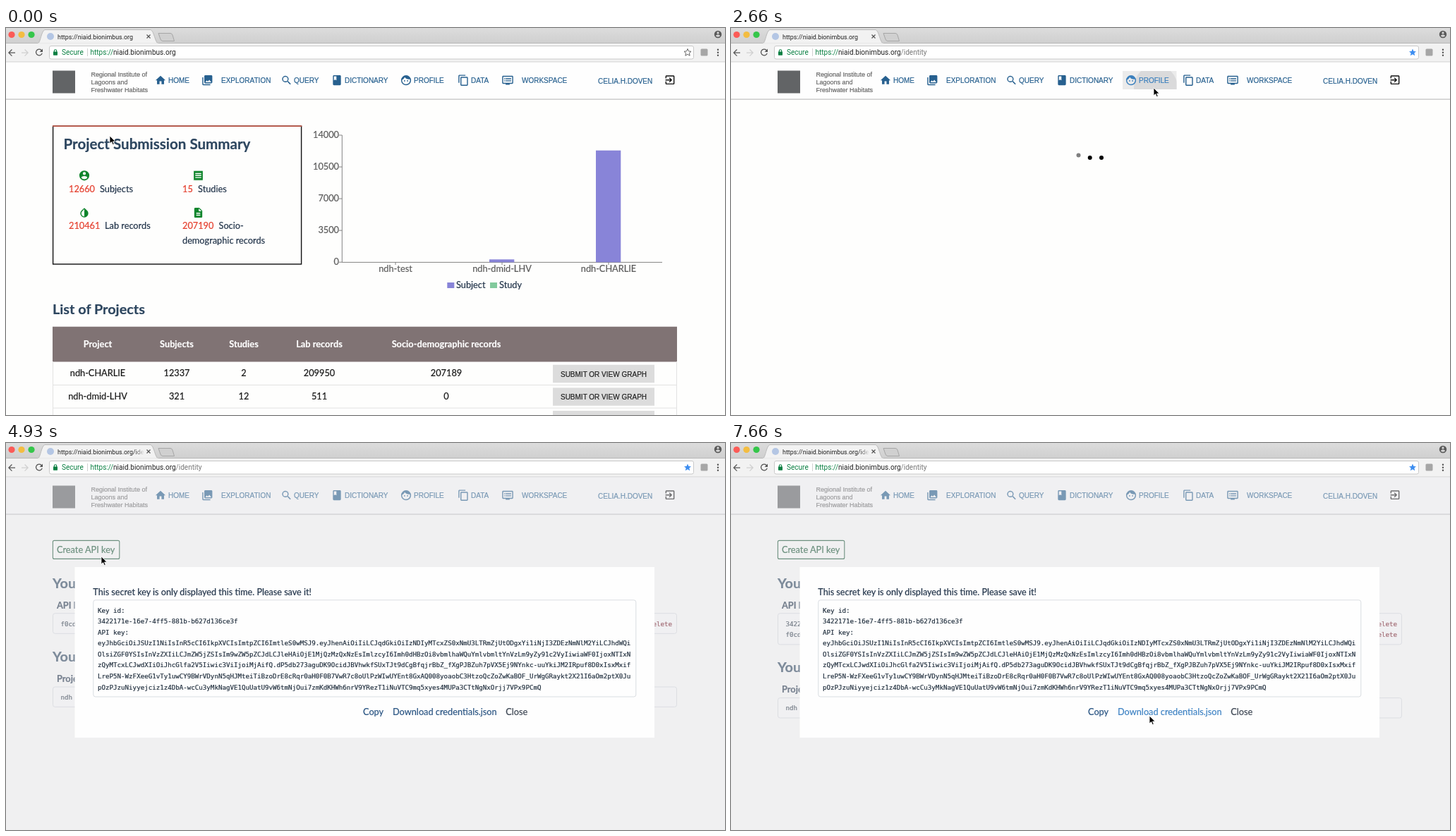
Animation of 1019x549 px, one loop 8 s. Source, as an HTML page:

```html
<!DOCTYPE html>
<html lang="en">
<head>
<meta charset="utf-8">
<title>API key walkthrough</title>
<style>
  html, body { margin: 0; width: 100%; height: 100%; overflow: hidden; background: #fefefd; }
  svg { display: block; }
  text, tspan { fill: currentColor; stroke: currentColor; stroke-width: .2px; }
  .ui { font-family: Roboto, sans-serif; font-size: 10.05px; color: #222; stroke-width: 0; }
  .ui tspan { stroke-width: 0; }
  .nav { font-family: "Liberation Sans", Arial, sans-serif; font-size: 10px; color: #27608f; }
  .icon { fill: currentColor; }
  .org { font-family: "Liberation Sans", Arial, sans-serif; font-size: 9px; color: #666; }
  .body { font-family: Lato, sans-serif; font-size: 12.75px; color: #22344a; }
  .bold { font-weight: 700; }
  .title { font-family: Lato, sans-serif; font-size: 19.85px; font-weight: 700; color: #2d465f; }
  .mono { font-family: "DejaVu Sans Mono", monospace; font-size: 9.17px; color: #22303f; }
  .mid { text-anchor: middle; }
  .end { text-anchor: end; }
  .on, .on .nav { color: #3a7fbd; }
</style>
</head>
<body>
<svg id="stage" width="1019" height="549" viewBox="0 0 1019 549"></svg>
<script>
const LOOP = 8000;
const host = 'niaid.bionimbus.org';
const keyId = '3422171e-16e7-4ff5-881b-b627d136ce3f';
const oldKeyId = 'f0cd5366-5185-4e5c-b2ae-3b7b798a9a0e';
const ROW = 15.6;

// The moments at which the screen changes state.
const AT = { hover: 430, load: 2660, profile: 2930, leaveNav: 3430, overButton: 3930,
             modal: 4930, newRow: 5930, overDownload: 6430 };

// Pointer poses: time, x, y; each holds until the next.
const pointer = [
  [0, 147, 153], [160, 376, 127], [430, 578, 79], [660, 585, 77], [930, 579, 72],
  [1160, 583, 75], [1430, 590, 80], [1660, 594, 83], [1930, 598, 85], [2160, 599, 85],
  [3160, 598, 88], [3430, 326, 141], [3660, 245, 153], [3930, 142, 160], [4160, 135, 161],
  [5430, 185, 190], [5660, 390, 285], [5930, 535, 345], [6160, 588, 371],
  [6430, 592, 385], [6660, 593, 387],
];

const text = (x, y, s, cls, more = '') => `<text x="${x}" y="${y}" class="${cls}" ${more}>${s}</text>`;
const rect = (x, y, w, h, fill, more = '') =>
  `<rect x="${x}" y="${y}" width="${w}" height="${h}" fill="${fill}" ${more}/>`;
const circle = (x, y, r, fill) => `<circle cx="${x}" cy="${y}" r="${r}" fill="${fill}"/>`;
const path = (d, stroke, more = '') => `<path d="${d}" stroke="${stroke}" fill="none" ${more}/>`;
const group = (id, inner, more = '') => `<g id="${id}" ${more}>${inner}</g>`;
const frame = (x, y, w, h, more = '') => rect(x, y, w, h, '#fefefe', `stroke="#d9dde1" rx="3" ${more}`);

const glyphs = {
  home: 'M10 20v-6h4v6h5v-8h3L12 3 2 12h3v8z',
  gallery: 'M22 16V4c0-1.1-.9-2-2-2H8c-1.1 0-2 .9-2 2v12c0 1.1.9 2 2 2h12c1.1 0 2-.9 2-2zm-11-4l2 2.7L16 11l4 5H8zM2 6v14c0 1.1.9 2 2 2h14v-2H4V6z',
  search: 'M15.5 14h-.8l-.3-.3A6.5 6.5 0 1 0 13.7 14.4l.3.3v.8l5 5 1.5-1.5zm-6 0a4.5 4.5 0 1 1 0-9 4.5 4.5 0 0 1 0 9z',
  book: 'M18 2H6c-1.1 0-2 .9-2 2v16c0 1.1.9 2 2 2h12c1.1 0 2-.9 2-2V4c0-1.1-.9-2-2-2zM6 4h5v8l-2.5-1.5L6 12z',
  face: 'M9 11.7a1.3 1.3 0 1 0 0 2.6 1.3 1.3 0 0 0 0-2.6zm6 0a1.3 1.3 0 1 0 0 2.6 1.3 1.3 0 0 0 0-2.6zM12 2a10 10 0 1 0 0 20 10 10 0 0 0 0-20zm0 18a8 8 0 0 1-7.95-8.86c2.36-1.05 4.23-2.98 5.21-5.37C11.07 8.33 14.05 10 17.42 10c.78 0 1.53-.09 2.25-.26A8 8 0 0 1 12 20z',
  copy: 'M16 1H4c-1.1 0-2 .9-2 2v14h2V3h12zm3 4H8c-1.1 0-2 .9-2 2v14c0 1.1.9 2 2 2h11c1.1 0 2-.9 2-2V7c0-1.1-.9-2-2-2zm0 16H8V7h11z',
  screen: 'M21 3H3c-1.1 0-2 .9-2 2v12c0 1.1.9 2 2 2h5v2h8v-2h5c1.1 0 2-.9 2-2V5c0-1.1-.9-2-2-2zm0 14H3V5h18zM19 8H8v2h11zm0 4H8v2h11zM7 8H5v2h2zm0 4H5v2h2z',
  exit: 'M10.1 15.6L11.5 17l5-5-5-5-1.4 1.4L12.7 11H3v2h9.7zM19 3H5c-1.1 0-2 .9-2 2v4h2V5h14v14H5v-4H3v4c0 1.1.9 2 2 2h14c1.1 0 2-.9 2-2V5c0-1.1-.9-2-2-2z',
  person: 'M12 2a10 10 0 1 0 0 20 10 10 0 0 0 0-20zm0 3a3 3 0 1 1 0 6 3 3 0 0 1 0-6zm0 14.2c-2.5 0-4.7-1.3-6-3.2 0-2 4-3.1 6-3.1s6 1.1 6 3.1c-1.3 1.9-3.5 3.2-6 3.2z',
  receipt: 'M18 17H6v-2h12zm0-4H6v-2h12zm0-4H6V7h12zM3 22l1.5-1.5L6 22l1.5-1.5L9 22l1.5-1.5L12 22l1.5-1.5L15 22l1.5-1.5L18 22l1.5-1.5L21 22V2l-1.5 1.5L18 2l-1.5 1.5L15 2l-1.5 1.5L12 2l-1.5 1.5L9 2 7.5 3.5 6 2 4.5 3.5 3 2z',
  drop: 'M17.7 7.9L12 2.3 6.3 7.9a8 8 0 1 0 11.4 0zM12 19.6a6 6 0 0 1-4.2-10.3L12 5.1z',
  page: 'M14 2H6c-1.1 0-2 .9-2 2v16c0 1.1.9 2 2 2h12c1.1 0 2-.9 2-2V8zm2 16H8v-2h8zm0-4H8v-2h8zm-3-5V3.5L18.5 9z',
  back: 'M20 11H7.8l5.6-5.6L12 4l-8 8 8 8 1.4-1.4L7.8 13H20z',
  reload: 'M17.65 6.35A8 8 0 1 0 19.7 14h-2.1A6 6 0 1 1 16.2 7.8L13 11h7V4z',
  star: 'M12 2l3 6.9 7 .6-5.3 4.7 1.6 7.3L12 17.6l-6.3 3.9 1.6-7.3L2 9.5l7-.6z',
};
const icon = (name, x, y, size = 17, more = 'class="icon"') =>
  `<path d="${glyphs[name]}" fill-rule="evenodd" transform="translate(${x - size / 2} ${y - size / 2}) scale(${size / 24})" ${more}/>`;

function browser() {
  const lights = ['#fb5b57', '#f3bd41', '#35c64a'].map((c, i) => circle(8 + 14 * i, 9.5, 4.6, c)).join('');
  return `<defs>
      <linearGradient id="bar" x2="0" y2="1"><stop stop-color="#dcdcdc"/><stop offset="1" stop-color="#cfcfcf"/></linearGradient>
      <linearGradient id="fade"><stop stop-color="#f2f2f2" stop-opacity="0"/><stop offset="1" stop-color="#f2f2f2"/></linearGradient>
    </defs>`
    + rect(0, 0, 1019, 22, 'url(#bar)') + rect(0, 22, 1019, 26, '#f2f2f2')
    + path('M0 21.5H1019', '#b9b9b9') + lights
    + '<path d="M45 22.2C49 21 50 4 55 2.5H205C210 4 211 21 216 22.2z" fill="#f2f2f2" stroke="#b0b0b0" stroke-width=".8"/>'
    + rect(45, 21.6, 171, 2, '#f2f2f2')
    + '<path d="M216 7.5H233Q235 7.5 236 10L238.5 18.5H222Q220 18.5 219 16z" fill="#d0d0d0" stroke="#a6a6a6"/>'
    + circle(63, 12, 5, '#b4c6e4')
    + text(73, 15.5, '', 'ui', 'id="tab" style="font-size:8.9px"')
    + rect(182, 4, 14, 16, 'url(#fade)')
    + path('M199.5 9.5l5 5m0-5l-5 5', '#555', 'stroke-width="1.2"')
    + icon('person', 1009, 9, 12.5, 'fill="#5a5a5a"')
    + icon('back', 8, 35, 15, 'fill="#555"')
    + `<g transform="scale(-1 1)">${icon('back', -27, 35, 15, 'fill="#cfcfcf"')}</g>`
    + icon('reload', 47, 34.5, 15, 'fill="#555"')
    + rect(61.5, 25.5, 913, 18.5, '#fff', 'stroke="#c9c9c9" rx="2.5"')
    + rect(67, 33.5, 6, 5.2, '#0b8043', 'rx=".6"') + path('M68.3 34v-1.6a1.7 1.7 0 0 1 3.4 0V34', '#0b8043', 'stroke-width="1.1"')
    + text(79, 38.2, 'Secure', 'ui', 'style="color:#0b8043"') + path('M115.5 29V40', '#d0d0d0')
    + text(119.5, 38.2, `<tspan style="color:#0b8043">https://</tspan>${host}<tspan id="route" style="color:#777">/identity</tspan>`, 'ui')
    + icon('star', 966, 34.5, 12, 'id="star"')
    + rect(984.5, 29.5, 10, 10, '#a6a6a6', 'rx="1.5"')
    + [30.8, 34.8, 38.8].map(y => circle(1009, y, 1.2, '#555')).join('');
}

function header() {
  const items = [
    ['home', 219, 230, 'HOME'], ['gallery', 285.3, 305, 'EXPLORATION'], ['search', 397.7, 408, 'QUERY'],
    ['book', 469, 480, 'DICTIONARY'], ['face', 567, 578, 'PROFILE'], ['copy', 648.3, 659, 'DATA'],
    ['screen', 711, 731, 'WORKSPACE'],
  ];
  return rect(0, 48, 1019, 53, '#fefefe') + rect(0, 47.5, 1019, 1, '#d4d4d4')
    + rect(0, 100.3, 1019, 1.7, '#d2d2d2')
    + rect(66, 60.5, 32, 32, '#626466')
    + ['Regional Institute of', 'Lagoons and', 'Freshwater Habitats'].map((s, i) => text(120.5, 69 + 11.2 * i, s, 'org')).join('')
    + rect(555, 61, 76.5, 26, '#ebebeb', 'id="navHover"')
    + '<clipPath id="navClip"><rect x="555" y="61" width="76.5" height="26"/></clipPath>'
    + '<circle id="ripple" cx="602" cy="84" fill="#dadadb" clip-path="url(#navClip)"/>'
    + items.map(([g, ix, tx, s]) => group('item' + s, `<g class="nav">${icon(g, ix, 74.2)}${text(tx, 78, s, 'nav')}</g>`)).join('')
    + text(839, 79, 'CELIA.H.DOVEN', 'nav') + icon('exit', 941, 73.7, 17, 'fill="#111"');
}

function summary() {
  const stats = [
    ['person', 111, 209.3, 89, '12660', 133, 'Subjects'], ['receipt', 272.5, 209.3, 250, '15', 272, 'Studies'],
    ['drop', 111, 262, 89, '210461', 140, 'Lab records'], ['page', 272.5, 262, 250, '207190', 301.5, 'Socio-'],
  ];
  return rect(66.6, 139.3, 352, 195.7, 'none', 'stroke="#111" stroke-width="1.4"') + rect(66, 138.3, 353.3, 1.7, '#b8503f')
    + text(81.5, 172.3, 'Project Submission Summary', 'title', 'style="font-size:20.55px"')
    + stats.map(([g, ix, iy, nx, n, lx, label]) => icon(g, ix, iy, 17, 'fill="#0f852c"')
      + text(nx, iy + 23.3, n, 'body', 'style="color:#e5402f"') + text(lx, iy + 23.3, label, 'body')).join('')
    + text(250, 306, 'demographic records', 'body');
}

function chart() {
  const grey = 'style="color:#5c5c5c"';
  let out = path('M476.3 152V332.4H930', '#777', 'stroke-width=".9"');
  for (let i = 0; i < 5; i++) {
    const y = 332.2 - 45.05 * i;
    out += path(`M472 ${y}h4.3`, '#777', 'stroke-width=".9"') + text(472, y + 4.2, 3500 * i, 'body end', grey);
  }
  ['ndh-test', 'ndh-dmid-LHV', 'ndh-CHARLIE'].forEach((s, i) => {
    const x = 552 + 151 * i;
    out += path(`M${x} 332v4`, '#777', 'stroke-width=".9"') + text(x, 346, s, 'body mid', grey);
  });
  return out + rect(685, 328.3, 35.3, 4, '#8884d8') + rect(836, 173.7, 35.3, 158.6, '#8884d8')
    + rect(625.3, 361, 10, 8, '#8884d8') + text(638, 368.5, 'Subject', 'body')
    + rect(686, 361, 10, 8, '#82ca9d') + text(699, 368.5, 'Study', 'body');
}

function projects() {
  const columns = [130, 242, 337, 444, 624];
  const cells = (values, y, color, cls = '') =>
    values.map((v, i) => text(columns[i], y, v, 'body mid ' + cls, `style="color:${color}"`)).join('');
  let out = text(66, 406.3, 'List of Projects', 'title') + rect(66, 423.7, 885, 49.8, '#807374')
    + cells(['Project', 'Subjects', 'Studies', 'Lab records', 'Socio-demographic records'], 452.7, '#fff', 'bold');
  [['ndh-CHARLIE', 12337, 2, 209950, 207189], ['ndh-dmid-LHV', 321, 12, 511, 0], []].forEach((row, i) => {
    const y = 32.6 * i;
    out += cells(row, 494.4 + y, '#1a1a1a') + rect(775, 477.8 + y, 144, 25.4, '#dcdcdc')
      + text(847, 494.6 + y, 'SUBMIT OR VIEW GRAPH', 'nav mid', 'style="color:#222"')
      + path(`M66 ${506.5 + y}H951`, '#e2e2e2');
  });
  return out + path('M66.5 473V549M950.5 473V549', '#e2e2e2');
}

function profile() {
  const remove = y => text(944, y, 'Delete', 'mono end', 'style="color:#741420"');
  return rect(66.4, 138.4, 94.4, 26, 'none', 'id="createBox" rx="2" stroke-width="1.1"')
    + text(72, 155.6, 'Create API key', 'body', 'id="createText"')
    + text(66, 206, 'You have the following API key(s)', 'title')
    + text(72, 234.6, 'API key(s)', 'body bold') + text(426, 234.6, 'Expires', 'body bold')
    + frame(66.5, 241.7, 884, 28.6, 'id="keyBox"')
    + group('freshRow', text(77.5, 259.6, keyId, 'mono') + remove(259.6))
    + group('shifted', text(77.5, 259.6, oldKeyId, 'mono') + text(425.5, 259.6, '4/21/2018, 12:33:00 PM', 'mono') + remove(259.6)
      + text(66, 309.6, 'You have access to the following project(s)', 'title')
      + text(72, 338.6, 'Project(s)', 'body bold') + text(338, 338.6, 'Right(s)', 'body bold')
      + frame(66.5, 346, 884, 28.4)
      + text(77.5, 363.6, 'ndh', 'mono') + text(338.5, 363.6, 'create, read, update, delete, upload', 'mono'));
}

function token() {
  const part = value => btoa(JSON.stringify(value)).replace(/=+$/, '');
  const signature = 'dP5db273aguDK9OcidJBVhwkfSUxTJt9dCgBfqjrBbZ_fXgPJBZuh7pVX5Ej9NYnkc-uuYkiJM2IRpuf8D0xIsxMxif'
    + 'LreP5N-WzFXeeG1vTy1uwCY9BWrVDynN5qHJMteiTiBzoDrE8cRqr0aH0F0B7VwR7c8oUl'
    + 'PzWIwUYEnt8GxAQ008yoaobC3HtzoQcZoZwKaBOF_UrWgGRaykt2X21I6aOm2ptX0Ju'
    + 'pOzPJzuNiyyejciz1z4DbA-wcCu3yMkNagVE1QuUatU9vW6tmNjOui7zmKdK'
    + 'HWh6nrV9YRezT1iNuVTC9mq5xyes4MUPa3CTtNgNxOrjj7VPx9PCmQ';
  return [
    part({ alg: 'RS256', typ: 'JWT', kid: 'key-01' }),
    part({ azp: '', jti: keyId, aud: ['data', 'user', 'fence', 'openid'], exp: 1524334171,
           iss: `https://${host}/user`, iat: 1521742171, pur: 'api_key', sub: '20' }),
    signature,
  ].join('.');
}

function modal() {
  const lines = ['Key id:', keyId, 'API key:', ...token().match(/.{1,137}/g)];
  return rect(0, 48, 1019, 501, '#dddee3', 'opacity=".45"') + rect(97.5, 176, 821.5, 242, '#fefefe')
    + text(123.3, 215.5, 'This secret key is only displayed this time. Please save it!', 'body', 'style="font-size:12.6px"')
    + frame(123.8, 222.8, 769, 137.2)
    + lines.map((s, i) => text(130, 240.7 + 15.55 * i, s, 'mono')).join('')
    + text(506, 386, 'Copy', 'body', 'style="color:#2a5583"')
    + text(548, 386, 'Download credentials.json', 'body', 'id="download"')
    + text(708.3, 386, 'Close', 'body', 'style="color:#3d4653"');
}

const loader = circle(492.5, 180.5, 3, '#808080') + circle(508.7, 184, 3, '#000') + circle(525, 184, 3, '#000');

document.getElementById('stage').innerHTML = rect(0, 0, 1019, 549, '#fefefd') + browser() + header()
  + group('homePage', summary() + chart() + projects()) + group('loader', loader)
  + group('profilePage', profile()) + group('modal', modal())
  + '<path id="pointer" d="M0 0V11l2.6-2.4 1.8 4 1.8-.8-1.7-3.8h3.6z" fill="#000" stroke="#fff" stroke-width=".8"/>';

const el = id => document.getElementById(id);
const show = (id, on) => el(id).setAttribute('display', on ? 'inline' : 'none');
const set = (id, attrs) => Object.entries(attrs).forEach(([k, v]) => el(id).setAttribute(k, v));

function render(t) {
  const since = name => t >= AT[name];
  const [, x, y] = pointer.filter(p => p[0] <= t).pop();
  set('pointer', { transform: `translate(${x} ${y})` });

  show('homePage', !since('load'));
  show('loader', since('load') && !since('profile'));
  show('profilePage', since('profile'));
  show('modal', since('modal'));
  show('route', since('load'));
  set('star', since('load') ? { fill: '#3c8df0', stroke: 'none' } : { fill: 'none', stroke: '#666', 'stroke-width': 2 });
  el('tab').textContent = `https://${host}${since('profile') ? '/ide' : ''}`;

  show('navHover', since('hover') && !since('leaveNav'));
  show('ripple', since('load') && !since('leaveNav'));
  set('ripple', { r: since('profile') ? 60 : 31 });
  el('itemPROFILE').classList.toggle('on', since('hover') && !since('modal'));

  const green = since('overButton') && !since('modal') ? '#2e842e' : '#12522f';
  set('createBox', { stroke: green });
  el('createText').style.color = green;

  const extra = since('newRow') ? ROW : 0;
  show('freshRow', extra > 0);
  set('shifted', { transform: `translate(0 ${extra})` });
  set('keyBox', { height: 28.6 + extra });
  el('download').style.color = since('overDownload') ? '#3f83c4' : '#2a5583';
}

const start = performance.now();
function tick() {
  render((performance.now() - start) % LOOP);
  requestAnimationFrame(tick);
}
render(0);
requestAnimationFrame(tick);
</script>
</body>
</html>
```
